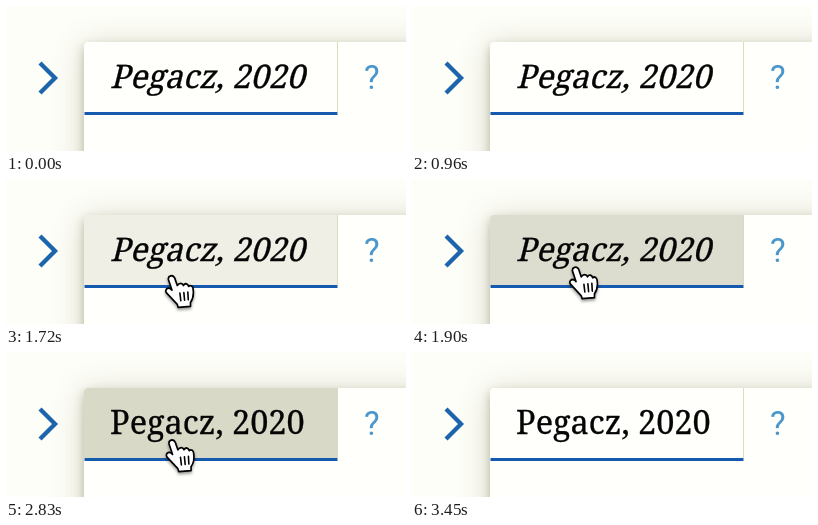
An HTML page that plays this animation: 400x145 px, repeating every 3.53 s.

```html
<!DOCTYPE html>
<html lang="en">
<head>
<meta charset="utf-8">
<title>Citation tab</title>
<style>
  html, body { margin: 0; width: 100%; height: 100%; overflow: hidden; background: #fefef9; }
  #stage { position: relative; width: 400px; height: 145px; overflow: hidden; }
  #panel {
    position: absolute; left: 78px; top: 36px; width: 420px; height: 240px;
    border-radius: 4px; background: #fffffc;
    box-shadow: 0 4px 32px rgba(80, 80, 20, .24), 0 4px 10px rgba(70, 70, 20, .28);
  }
  svg { position: absolute; left: 0; top: 0; }
  .cite { font: 32.5px "Noto Serif", serif; fill: #050505; stroke: #050505; stroke-width: .3; }
  .help { font: 33px Roboto, sans-serif; fill: #4b97cc; }
  #cursor { filter: drop-shadow(0 2px 1.5px rgba(0, 0, 0, .4)); }
</style>
</head>
<body>
<div id="stage">
  <div id="panel"></div>
  <svg width="400" height="145" viewBox="0 0 400 145">
    <path d="M34 57L49 72L34 87" fill="none" stroke="#1c64ac" stroke-width="4.3"/>
    <path d="M331.5 36V106" stroke="#dddcc0"/>
    <path id="hover" d="M78 106V40Q78 36 82 36H332V106Z" fill="#d9d9c8" opacity="0"/>
    <rect x="78.5" y="106" width="253" height="3" fill="#165ab0"/>
    <g transform="translate(104 82)"><text id="cite" class="cite">Pegacz, 2020</text></g>
    <text class="help" x="358" y="82.500">?</text>
    <g id="cursor">
      <path id="arrow" d="M0 0V27L6.5 21L11 31L16 29L11.500 19.500H20Z"
        fill="#000" stroke="#fff" stroke-width="1.6"/>
      <g id="hand" transform="translate(1.5 0) scale(.88 .95)" stroke="#000"
        stroke-linecap="round" stroke-linejoin="round">
        <path d="M-4 4C-5 0 1 -2 3 2L6 10C8 7 12 7 13 10C15 7 18 8 19 11C21 9 24 11 24 14C25 20 24 24 21 28V32L7 33L6 30C3 27 -1 23 -6 18C-9 15 -5 11 -1 14L0 15Z"
          fill="#fff" stroke-width="1.9"/>
        <path d="M9 18L10 26M13.500 17.500L14.300 25.500M18 17L18.500 25" fill="none" stroke-width="1.8"/>
      </g>
    </g>
  </svg>
</div>
<script>
  const LOOP = 3530, ENTER = 1610, LEAVE = 2930, CLICK = 2530, FADE = 450;
  // Pointer path: time, x, y
  const path = [
    [1220, 176, 146], [1340, 173, 132], [1720, 164.5, 97],
    [2220, 159, 73], [2360, 158.5, 71], [2750, 158.5, 71],
    [2830, 165, 88], [3130, 188, 150]
  ];
  const $ = id => document.getElementById(id);
  const cite = $("cite"), hover = $("hover"), cursor = $("cursor"), arrow = $("arrow"), hand = $("hand");

  const show = (el, on) => el.setAttribute("visibility", on ? "visible" : "hidden");

  function fade(t, start) {
    const p = Math.min(1, Math.max(0, (t - start) / FADE));
    return 1 - (1 - p) ** 2;
  }

  function pointerAt(t) {
    const i = path.findIndex(k => k[0] > t);
    if (i < 1) return null;
    const [t0, x0, y0] = path[i - 1], [t1, x1, y1] = path[i];
    const p = (t - t0) / (t1 - t0);
    return [x0 + (x1 - x0) * p, y0 + (y1 - y0) * p];
  }

  function draw(t) {
    const pos = pointerAt(t), over = t >= ENTER && t < LEAVE;
    if (pos) cursor.setAttribute("transform", `translate(${pos[0]} ${pos[1]})`);
    show(arrow, pos && !over);
    show(hand, pos && over);
    hover.setAttribute("opacity", fade(t, ENTER) - fade(t, LEAVE));
    cite.setAttribute("transform", t < CLICK ? "skewX(-14)" : "");
  }

  function tick() {
    draw(performance.now() % LOOP);
    requestAnimationFrame(tick);
  }
  tick();
</script>
</body>
</html>
```
